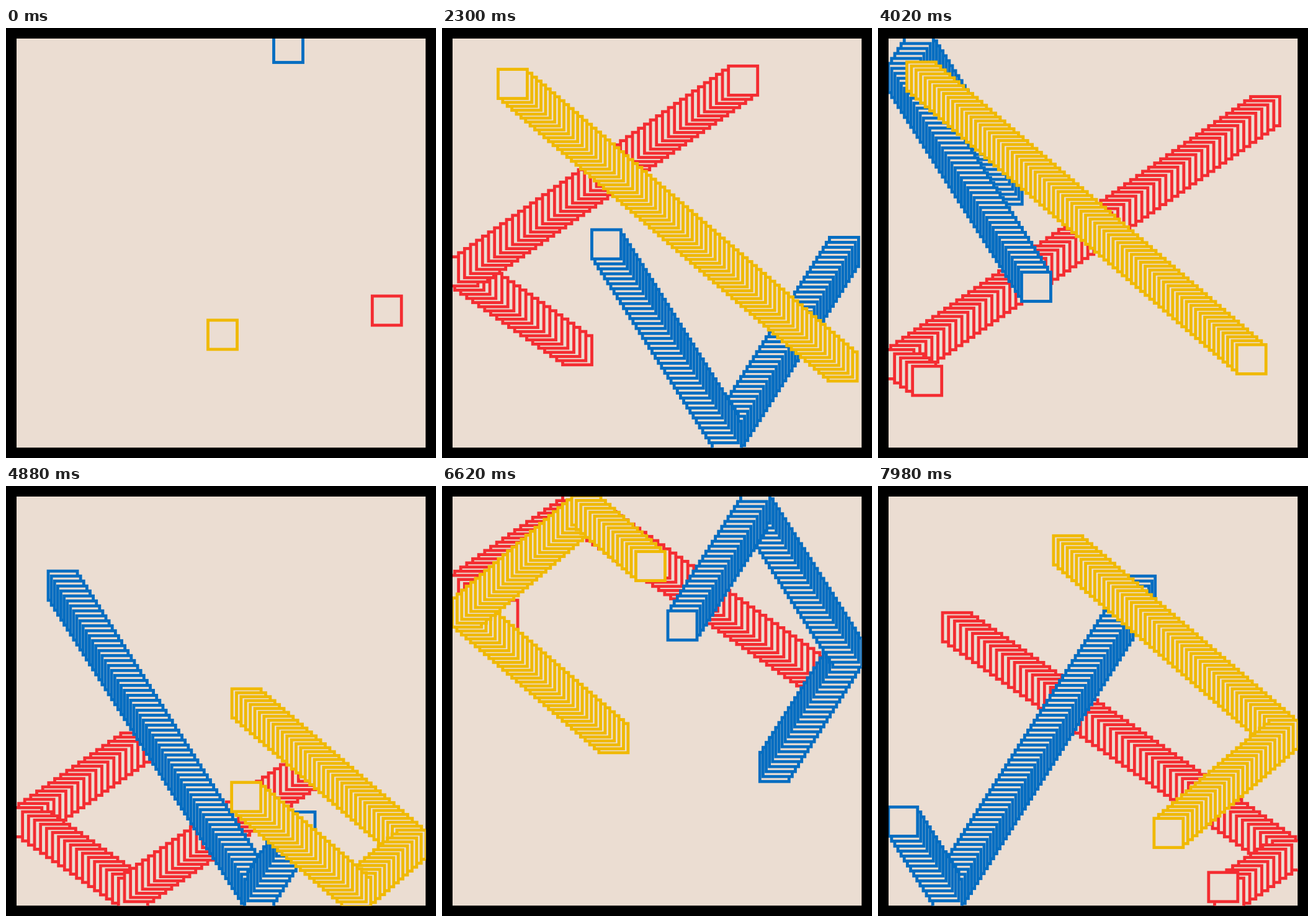
An HTML page with a canvas for the animation above (8000 ms loop, 693 by 693 pixels).

```html
<!DOCTYPE html>
<html lang="en">
<head>
<meta charset="utf-8">
<title>Bouncing squares</title>
<style>
  html, body { margin: 0; width: 100%; height: 100%; overflow: hidden; background: #000; }
  canvas { display: block; width: 693px; height: 693px; }
</style>
</head>
<body>
<canvas id="stage" width="693" height="693"></canvas>
<script>
const ctx = document.getElementById('stage').getContext('2d');
const STEP = 20, STEPS = 400;
const PAPER = '#ebddd2';
const EDGE = 17, ROOM = 659.5;      // paper inside the black frame
const SIDE = 47, LINE = 4.8;
const MIN = 40.5, MAX = 653;        // limits for a square's centre

// Squares in drawing order; trail = number of earlier squares kept
const squares = [
  { color: '#f42c31', trail: 65, x: [613.8, 9.667], y: [455.5, 6.685] },
  { color: '#056dc1', trail: 75, x: [455, 5.106], y: [32, -8.01] },
  { color: '#f0b902', trail: 72, x: [349, 7.385], y: [494.4, 6.325] }
];

// A square may pass a wall for one step; it then restarts from the wall.
function bounce([pos, speed]) {
  const path = [];
  for (let i = 0; i < STEPS; i++) {
    path.push(pos);
    if (pos > MAX) { pos = MAX; speed = -Math.abs(speed); }
    else if (pos < MIN) { pos = MIN; speed = Math.abs(speed); }
    pos += speed;
  }
  return path;
}

for (const s of squares) {
  s.xs = bounce(s.x);
  s.ys = bounce(s.y);
}

function draw(step) {
  ctx.fillStyle = '#000';
  ctx.fillRect(0, 0, 693, 693);
  ctx.save();
  ctx.beginPath();
  ctx.rect(EDGE, EDGE, ROOM, ROOM);
  ctx.clip();
  ctx.fillStyle = PAPER;
  ctx.fillRect(EDGE, EDGE, ROOM, ROOM);
  ctx.lineWidth = LINE;
  for (const s of squares) {
    ctx.strokeStyle = s.color;
    for (let i = Math.max(0, step - s.trail); i <= step; i++) {
      const box = [s.xs[i] - SIDE / 2, s.ys[i] - SIDE / 2, SIDE, SIDE];
      ctx.fillRect(...box);
      ctx.strokeRect(...box);
    }
  }
  ctx.restore();
}

const start = performance.now();
function tick() {
  const time = Math.max(0, performance.now() - start);
  draw(Math.floor(time / STEP) % STEPS);
  requestAnimationFrame(tick);
}
tick();
</script>
</body>
</html>
```
